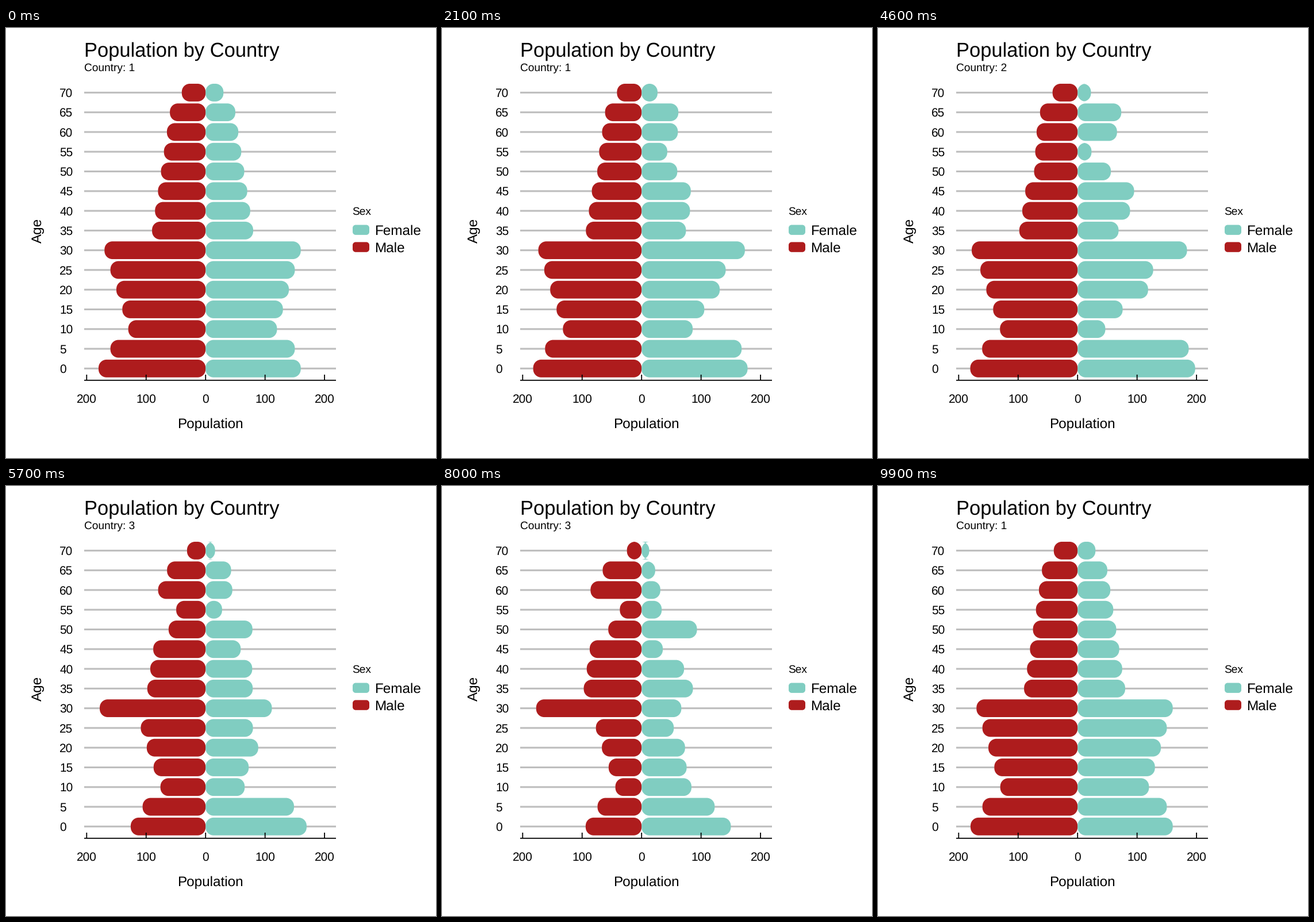
These frames come from a looping animation (748x748 px, 10 s). A matplotlib script:

```python
import numpy as np
import matplotlib.pyplot as plt
from matplotlib.animation import FuncAnimation
from matplotlib.patches import PathPatch
from matplotlib.path import Path

SIZE, DPI, FRAMES = 748, 100, 100
PT = 1.736                      # pixels per point of the chart's text
RED, TEAL, GREY = "#AE1C1D", "#80CDC1", "#BEBEBE"
LEFT, RIGHT, ZERO, UNIT = 136, 574, 347.2, 1.0345
ROW0, PITCH, AXIS = 592.3, 34.28, 612.8
BAR_H, RADIUS = 0.9 * PITCH, 8 * PT

AGES = np.arange(0, 75, 5)

# Country 1: a wide young half, a narrowing old half, women 10 below men
male_1 = np.where(AGES <= 30, 110 + 2 * AGES, 125 - AGES)
male_1[[0, 1, -1]] = 180, 160, 40
female_1 = male_1 - 10 - 10 * (AGES == 0)

# Country 2: slightly more men; country 3: 100 fewer young men
male_2 = male_1 + np.interp(AGES, [10, 20, 45, 50, 55], [5, 8, 8, -1, 3])
male_3 = male_2 - 100 * (AGES < 30)
male_3[AGES >= 50] += [-20, -40, 20, 3, -20]

female_2 = [200, 190, 45, 76, 121, 131, 190, 68, 89, 98, 54, 23, 68, 76, 23]
female_3 = [149, 120, 80, 70, 66, 44, 57, 87, 71, 32, 96, 31, 29, 20, 11]

MALE = np.array([male_1, male_2, male_3])
FEMALE = np.array([female_1, female_2, female_3])

# Start and end step of each linear move; the label follows past halfway
MOVES = [(11, 33), (45, 67), (79, 100)]
LABEL_DELAY = 12

plt.rcParams["font.family"] = "Liberation Sans"
plt.rcParams["text.hinting"] = "none"

fig = plt.figure(figsize=(SIZE / DPI, SIZE / DPI), dpi=DPI, facecolor="white")
ax = fig.add_axes([0, 0, 1, 1])
ax.set_xlim(0, SIZE)
ax.set_ylim(SIZE, 0)
ax.axis("off")


def round_rect(x0, x1, y0, y1, r):
    """Rounded box; arcs may cross when the box is narrower than 2r."""
    k = r * 0.4477
    pts = [(x0 + r, y0), (x1 - r, y0),
           (x1 - k, y0), (x1, y0 + k), (x1, y0 + r), (x1, y1 - r),
           (x1, y1 - k), (x1 - k, y1), (x1 - r, y1), (x0 + r, y1),
           (x0 + k, y1), (x0, y1 - k), (x0, y1 - r), (x0, y0 + r),
           (x0, y0 + k), (x0 + k, y0), (x0 + r, y0), (x0 + r, y0)]
    corner = [Path.CURVE4] * 3
    codes = [Path.MOVETO, Path.LINETO] + (corner + [Path.LINETO]) * 3
    return Path(pts, codes + corner + [Path.CLOSEPOLY])


def text(x, y, s, pt, va="baseline", **kw):
    return ax.text(x, y, s, fontsize=pt * PT * 72 / DPI, color="black",
                   va=va, zorder=5, **kw)


def line(x, y, color, width, z):
    ax.plot(x, y, color=color, lw=width * 72 / DPI, zorder=z,
            solid_capstyle="butt", snap=False)


def shape(path, color):
    return ax.add_patch(PathPatch(path, fc=color, ec="none", lw=0, zorder=2))


def bar_path(i, value, side):
    y = ROW0 - i * PITCH
    x0, x1 = sorted((ZERO, ZERO + side * value * UNIT))
    return round_rect(x0, x1, y - BAR_H / 2, y + BAR_H / 2, RADIUS)


# Grid, axis and labels
for i, age in enumerate(AGES):
    y = ROW0 - i * PITCH
    line([LEFT, RIGHT], [y, y], GREY, 3.1, 1)
    text(93.3, y + 7.5, str(age), 12)
line([LEFT, RIGHT], [AXIS, AXIS], "black", 1.8, 4)
for v in range(-200, 201, 100):
    x = ZERO + v * UNIT
    line([x, x], [603, AXIS], "black", 1.8, 4)
    text(x, 651.5, str(abs(v)), 12, ha="center")

text(136, 50, "Population by Country", 19.9)
subtitle = text(136, 75, "", 11)
text(355, 696, "Population", 14, ha="center")
text(67, 352.3, "Age", 14, va="center", ha="right", rotation=90)

# Legend
text(602.2, 324.5, "Sex", 11)
for name, color, y in (("Female", TEAL, 351.2), ("Male", RED, 381.1)):
    shape(round_rect(603, 632, y - 8.7, y + 8.7, 5.2), color)
    text(640.6, y + 9, name, 14)

bars = [(shape(bar_path(i, table[0, i], side), color), i, side, table)
        for table, side, color in ((MALE, -1, RED), (FEMALE, 1, TEAL))
        for i in range(len(AGES))]


def update(frame):
    # 101 steps are spread over 100 frames, so one step is skipped midway
    step = round(frame * FRAMES / (FRAMES - 1))
    pos = sum(np.clip((step - a) / (b - a), 0, 1) for a, b in MOVES)
    here = int(pos) % 3
    there, t = (here + 1) % 3, pos % 1
    for patch, i, side, table in bars:
        value = (1 - t) * table[here, i] + t * table[there, i]
        patch.set_path(bar_path(i, value, side))
    country = sum(step >= a + LABEL_DELAY for a, _ in MOVES) % 3 + 1
    subtitle.set_text(f"Country: {country}")
    return [subtitle] + [bar[0] for bar in bars]


anim = FuncAnimation(fig, update, frames=FRAMES, interval=100, repeat=True,
                     repeat_delay=0, init_func=lambda: update(0))
plt.show()
```
